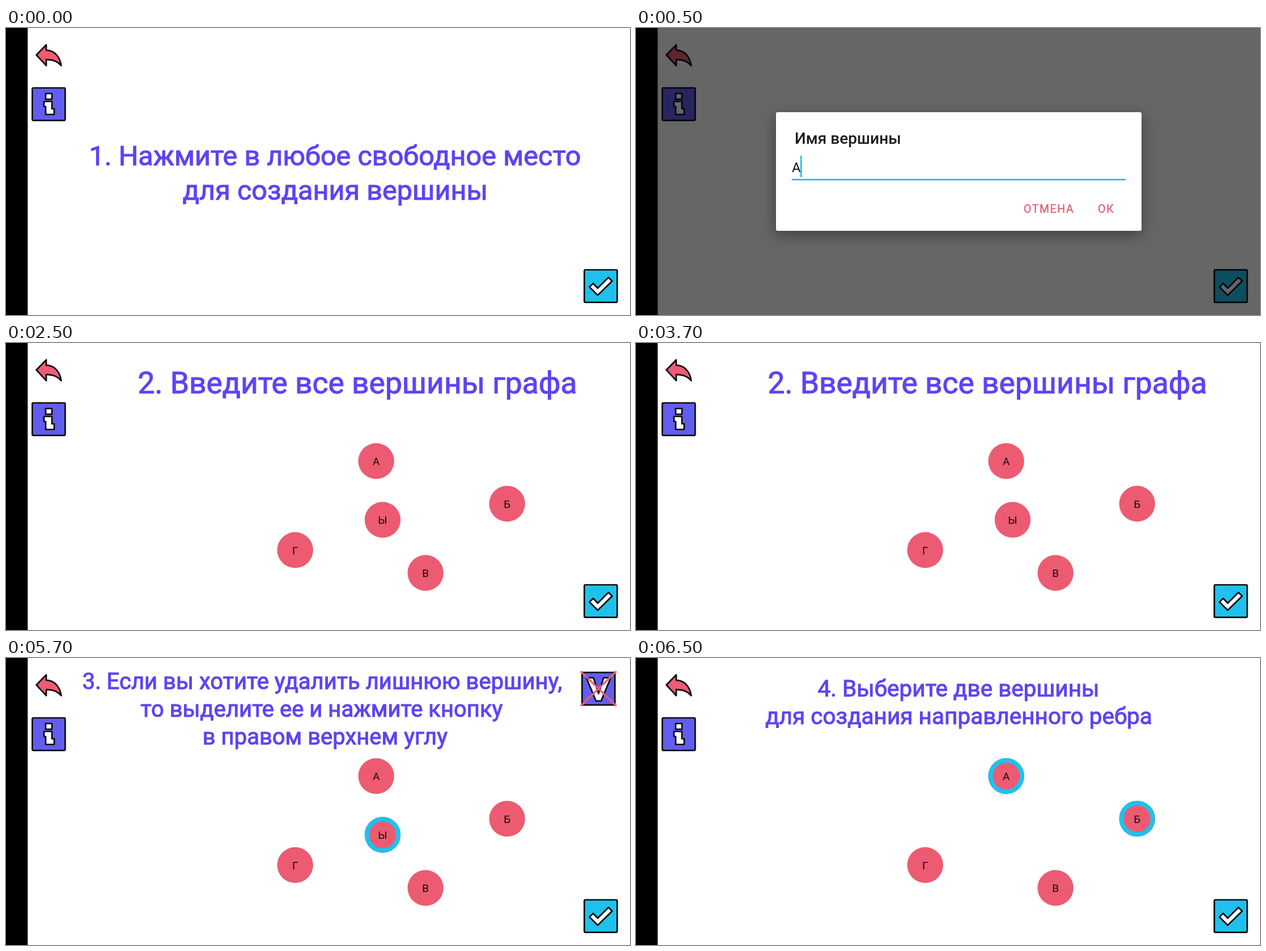
These frames come from a looping animation (1101x508 px, 8000 ms). An HTML page:

```html
<!DOCTYPE html>
<html lang="ru">
<head>
<meta charset="utf-8">
<title>Создание графа</title>
<style>
  html, body { margin: 0; width: 100%; height: 100%; overflow: hidden; background: #fff; }
  svg { display: block; width: 1101px; height: 508px; font-family: Roboto, sans-serif; }
  .hint { fill: #5c44f5; stroke: #5c44f5; stroke-width: 1.1; stroke-linejoin: round; text-anchor: middle; }
  .icon { stroke: #0b0b0b; stroke-width: 2.7; stroke-linejoin: round; }
  .vertex circle { fill: #ec5b72; }
  .vertex text { font-size: 19px; text-anchor: middle; fill: #160a0c; }
  .vertex .ring { fill: none; stroke: #1fc1ec; stroke-width: 8; }
  .button { font-size: 19.5px; letter-spacing: 1.6px; fill: #e25a70; stroke: #e25a70; stroke-width: .3; }
  #dialog .card { fill: #fff; filter: drop-shadow(0 7px 12px rgba(0, 0, 0, .4)); }
</style>
</head>
<body>
<svg viewBox="0 0 1101 508">
  <rect width="1101" height="508" fill="#fff"/>
  <g class="icon">
    <path fill="#ee5b73" d="M53.500 47.700L71 29.800V39.300C85 39.500 95 50 97.500 66.700C90.500 58 82 55.500 71 55.800V66.700Z"/>
    <rect x="46.400" y="106" width="58" height="57.600" rx="2" fill="#625df0"/>
    <path fill="#fff" d="M70 116H81V126H70ZM67 130H81V143H85V153H70V139H67Z"/>
    <rect x="1020.400" y="428" width="58" height="57.600" rx="2" fill="#1fc1ec"/>
    <path fill="#fff" d="M1029.500 458.500L1036 452L1044 460.500L1063 441.500L1069.500 448L1044 473Z"/>
  </g>
  <g id="remove">
    <g class="icon">
      <rect x="1016.400" y="25.600" width="58" height="57.600" rx="2" fill="#625df0"/>
      <path fill="#fff" d="M1024 35H1036.500L1045.500 63L1054.500 35H1067L1050 76H1041Z"/>
    </g>
    <path stroke="#ee5b73" stroke-width="3.200" d="M1014 23.500L1077 85M1077 23.500L1014 85"/>
  </g>
  <g id="scene"></g>
  <g id="dialog">
    <rect width="1101" height="508" opacity=".6"/>
    <rect class="card" x="247" y="149" width="645" height="210" rx="3"/>
    <text x="280" y="204.500" font-size="28" font-weight="500" fill="#1c1c1c">Имя вершины</text>
    <text x="275" y="255" font-size="24" fill="#111">А</text>
    <path stroke="#1fc1ec" stroke-width="2.800" d="M291.300 226V264M275 268.300H864"/>
    <text class="button" x="684" y="327">ОТМЕНА</text>
    <text class="button" x="815" y="327">ОК</text>
  </g>
  <rect width="38.300" height="508"/>
</svg>
<script>
const LOOP = 8000;
const vertices = {
  А: [653.2, 209], Б: [884.2, 284.5], В: [740.2, 407], Г: [510.2, 366.5], Ы: [664.5, 313]
};
// Hint lines are [centre x, baseline, text].
const steps = [
  { start: 0, size: 48.6, lines: [
    [580.5, 242.5, '1. Нажмите в любое свободное место'],
    [581, 303.5, 'для создания вершины']] },
  { start: 500, dialog: true },
  { start: 2500, size: 53.4, shown: 'АБВГЫ', lines: [
    [620, 88.5, '2. Введите все вершины графа']] },
  { start: 4500, size: 40, shown: 'АБВГЫ', picked: 'Ы', remove: true, lines: [
    [558, 55, '3. Если вы хотите удалить лишнюю вершину,'],
    [557, 104, 'то выделите ее и нажмите кнопку'],
    [563, 153, 'в правом верхнем углу']] },
  { start: 6500, size: 40.5, shown: 'АБВГ', picked: 'АБ', lines: [
    [569, 68, '4. Выберите две вершины'],
    [569.5, 117, 'для создания направленного ребра']] }
];

const byId = id => document.getElementById(id);
const toggle = (id, on) => byId(id).setAttribute('display', on ? 'inline' : 'none');

function vertex(name, picked) {
  const [x, y] = vertices[name];
  const ring = picked ? '<circle class="ring" r="27.7"/>' : '';
  return `<g class="vertex" transform="translate(${x} ${y})">
    <circle r="31.7"/>${ring}<text y="7.2">${name}</text></g>`;
}

function render({ size, lines = [], shown = '', picked = '', dialog, remove }) {
  byId('scene').innerHTML =
    lines.map(([x, y, text]) =>
      `<text class="hint" x="${x}" y="${y}" font-size="${size}">${text}</text>`).join('') +
    [...shown].map(name => vertex(name, picked.includes(name))).join('');
  toggle('dialog', dialog);
  toggle('remove', remove);
}

const origin = performance.now();
let current;
function tick() {
  const time = (performance.now() - origin) % LOOP;
  const step = steps.findLast(s => s.start <= time);
  if (step !== current) render(current = step);
  requestAnimationFrame(tick);
}
tick();
</script>
</body>
</html>
```
